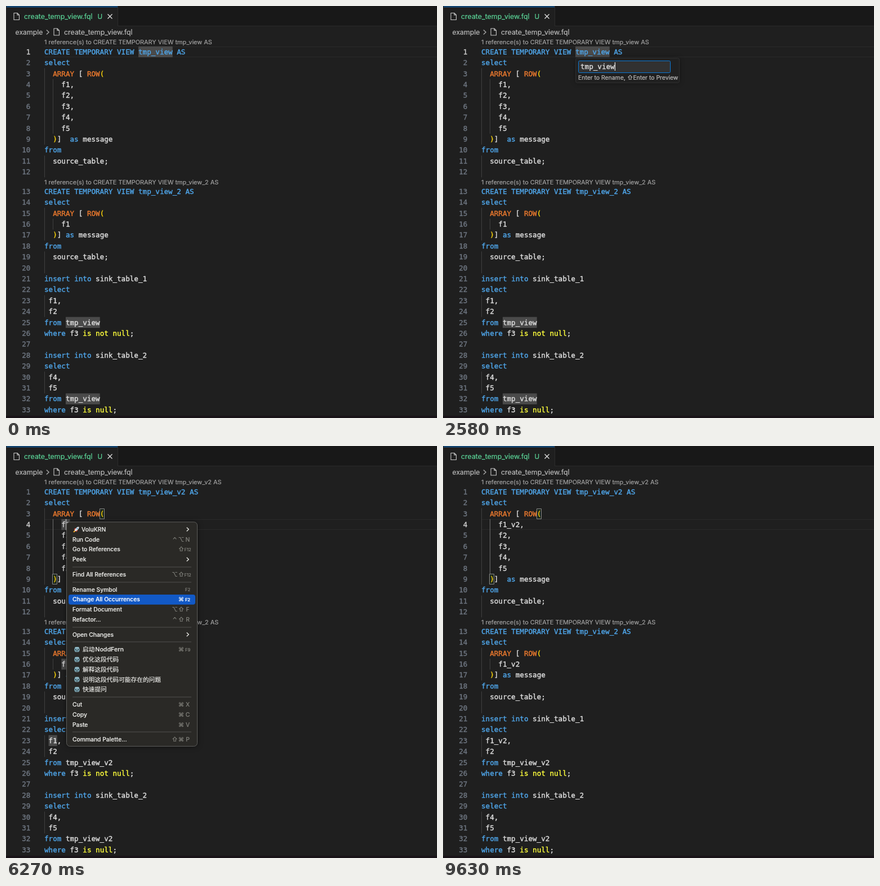
An HTML page with a canvas for the animation above (9660 ms loop, 765 px wide and 732 px high).

```html
<!DOCTYPE html>
<html lang="en">
<head>
<meta charset="utf-8">
<title>Rename symbol</title>
<style>
html, body { margin: 0; height: 100%; overflow: hidden; background: #1f1f1f; }
canvas { display: block; }
</style>
</head>
<body>
<canvas id="stage" width="765" height="732"></canvas>
<script>
const ctx = document.getElementById('stage').getContext('2d');
const LOOP = 9660, LEFT = 68, CHAR = 7.59, ROW = 19.4;
const MONO = '12.6px "DejaVu Sans Mono", "Liberation Mono", monospace';
const ui = (size, weight = 400) =>
  `${weight} ${size}px Inter, "Noto Sans CJK SC", "Noto Sans CJK", "DejaVu Sans", sans-serif`;
const BLUE = '#4fa6ea', ORANGE = '#e8782e', YELLOW = '#ffff3c', GOLD = '#ffd70a',
  TEXT = '#dedede', GREEN = '#5ad296', ACCENT = '#0a78d6';

const MENUS = [
  { x: 274, y: 73, open: 690, move: 900, settle: 1650, pick: 1860, close: 2250 },
  { x: 107, y: 134.5, open: 5730, move: 5850, settle: 6270, pick: 6360, close: 6990 }
];
const POPUPS = [
  { line: 1, col: 22, word: 'tmp_view', open: 2430, ready: 2580, keys: [3270, 3420, 3570], close: 3840 },
  { line: 4, col: 4, word: 'f1', open: 7200, ready: 7440, keys: [7890, 7980, 8130], close: 8280 }
];
const CARET_ON = [[90, 2430], [3840, 4200], [4740, 7200], [8310, 8670], [9180, 9630]];

// label | shortcut modifiers | key; '>' marks a submenu, '-' a separator
const ITEMS = `VoluKRN|>
Run Code|⌃⌥|N
Go to References|⇧|F12
Peek|>
-
Find All References|⌥⇧|F12
-
Rename Symbol||F2
Change All Occurrences|⌘|F2
Format Document|⌥⇧|F
Refactor...|⌃⇧|R
-
Open Changes|>
-
启动 NoddFern|⌘|F9
优化这段代码
解释这段代码
说明这段代码可能存在的问题
快速提问
-
Cut|⌘|X
Copy|⌘|C
Paste|⌘|V
-
Command Palette...|⇧⌘|P`.split('\n');
const RENAME = 5, CHANGE_ALL = 6;

const code = (view, field) => `CREATE TEMPORARY VIEW ${view} AS
select
  ARRAY [ ROW(
    ${field},
    f2,
    f3,
    f4,
    f5
  )]  as message
from
  source_table;

CREATE TEMPORARY VIEW tmp_view_2 AS
select
  ARRAY [ ROW(
    ${field}
  )] as message
from
  source_table;

insert into sink_table_1
select
 ${field},
 f2
from ${view}
where f3 is not null;

insert into sink_table_2
select
 f4,
 f5
from ${view}
where f3 is null;`.split('\n');

const within = (t, [a, b]) => t >= a && t < b;
const lineY = n => n < 13 ? 81.4 + ROW * (n - 1) : 329.4 + ROW * (n - 13);
const colX = c => LEFT + c * CHAR;

function rect(x, y, w, h, color) {
  ctx.fillStyle = color;
  ctx.fillRect(x, y, w, h);
}

// A hairline stroke gives the text the slightly heavy look of smoothed glyphs.
function label(str, x, y, font, color, align = 'left') {
  ctx.font = font;
  ctx.fillStyle = ctx.strokeStyle = color;
  ctx.textAlign = align;
  ctx.lineWidth = font === MONO ? .38 : .22;
  ctx.lineJoin = 'round';
  ctx.fillText(str, x, y);
  ctx.strokeText(str, x, y);
}

function round(x, y, w, h, r, fill, stroke) {
  ctx.beginPath();
  ctx.roundRect(x, y, w, h, r);
  if (fill) { ctx.fillStyle = fill; ctx.fill(); }
  if (stroke) { ctx.strokeStyle = stroke; ctx.lineWidth = 1; ctx.stroke(); }
}

function shape(path, x, y, color, width = 1.1) {
  ctx.save();
  ctx.translate(x, y);
  ctx.strokeStyle = color;
  ctx.lineWidth = width;
  ctx.stroke(new Path2D(path));
  ctx.restore();
}

const fileIcon = (x, y) => shape('M.5 .5H6.5L10 4V12.5H.5ZM6.5 .5V4H10', x, y, '#c8c8c8');
const chevron = (x, y, color, s = 1) =>
  shape(`M${-1.8 * s} ${-3.4 * s}L${1.8 * s} 0L${-1.8 * s} ${3.4 * s}`, x, y, color, 1.4);

function header() {
  rect(0, 0, 765, 36, '#181818');
  rect(198, 35, 567, 1, '#2b2b2b');
  rect(0, 1, 198, 35, '#1f1f1f');
  rect(198, 0, 1, 36, '#2b2b2b');
  rect(0, 1, 198, 1, ACCENT);
  fileIcon(13.5, 12);
  label('create_temp_view.fql', 32, 23.3, ui(12.4), GREEN);
  label('U', 162.5, 23, ui(11.6), GREEN);
  shape('M0 0L8 8M8 0L0 8', 180.5, 14.5, '#e0e0e0', 1.3);
  label('example', 16.5, 50.7, ui(12.3), '#b8b8b8');
  chevron(74, 46.5, '#a8a8a8', 1.2);
  fileIcon(84.5, 39.5);
  label('create_temp_view.fql', 103, 50.7, ui(12.4), '#b8b8b8');
}

function tokenColor(word, line) {
  if (line.startsWith('CREATE')) return BLUE;
  if (/^(ARRAY|ROW)$/.test(word)) return ORANGE;
  if (/^(select|from|as|insert|into|where)$/.test(word)) return BLUE;
  if (/^(is|not|null)$/.test(word)) return YELLOW;
  return /[()]/.test(word) ? GOLD : TEXT;
}

function guide(col, from, to, color = '#404040') {
  const top = lineY(from) - ROW / 2;
  rect(Math.round(colX(col)), top, 1, lineY(to) + ROW / 2 - top, color);
}

function bracketBox(line, col) {
  ctx.strokeStyle = '#888';
  ctx.lineWidth = 1;
  ctx.fillStyle = 'rgba(0,100,0,.1)';
  const box = [Math.round(colX(col)) - .5, Math.round(lineY(line) - 9.7) + .5, 8, 18];
  ctx.fillRect(...box);
  ctx.strokeRect(...box);
}

function editor(t) {
  const view = t < 3870 ? 'tmp_view' : 'tmp_view_v2';
  const field = t < 8310 ? 'f1' : 'f1_v2';
  const active = t < 5190 ? 1 : 4;
  const lines = code(view, field);

  const y = Math.round(lineY(active) - 9.7);
  rect(LEFT, y, 697, 1, '#2a2a2a');
  rect(LEFT, y + 18, 697, 1, '#2a2a2a');

  const marks = t < 3840 ? [[1, 22, 8], [25, 5, 8], [32, 5, 8]]
    : within(t, [5790, 8310]) ? [[4, 4, 2], [16, 4, 2], [23, 1, 2]] : [];
  for (const [n, col, len] of marks)
    rect(colX(col), lineY(n) - 9.7, len * CHAR, ROW, '#4a4a4a');

  for (const [a, b] of [[3, 9], [11, 12], [15, 17], [19, 20], [23, 24], [30, 31]]) guide(0, a, b);
  guide(2, 4, 8, active === 4 ? '#707070' : '#404040');
  guide(2, 16, 16);
  if (active === 4) { bracketBox(3, 13); bracketBox(9, 2); }

  lines.forEach((line, i) => {
    const base = lineY(i + 1) + 4.3;
    label(i + 1, 43.3, base, MONO, i + 1 === active ? '#d0d0d0' : '#6e7681', 'right');
    for (const m of line.matchAll(/\w+|[^\w\s]/g))
      label(m[0], colX(m.index), base, MONO, tokenColor(m[0], line));
  });

  const lens = name => `1 reference(s) to CREATE TEMPORARY VIEW ${name} AS`;
  label(lens(t < 4200 ? 'tmp_view' : 'tmp_view_v2'), LEFT, 67.8, ui(10.88), '#a0a0a0');
  label(lens('tmp_view_2'), LEFT, 316.6, ui(10.88), '#a0a0a0');

  if (CARET_ON.some(span => within(t, span)))
    rect(colX(active === 1 ? 27 : 5) - .2, lineY(active) - 9.7, 1.6, ROW, '#b8b8b8');
}

function popup(p, t) {
  if (!within(t, [p.open, p.close])) return;
  const x = Math.round(colX(p.col)), y = Math.round(lineY(p.line) + 10.8);
  const value = p.word + '_v2'.slice(0, p.keys.filter(k => t >= k).length);
  ctx.save();
  ctx.shadowColor = 'rgba(0,0,0,.4)';
  ctx.shadowBlur = 8;
  round(x + .5, y + .5, 184, 44, 3, '#202020');
  ctx.restore();
  round(x + .5, y + .5, 184, 44, 3, null, '#303030');
  round(x + 5.5, y + 5.5, 163, 21, 2, '#313131', ACCENT);
  if (t < p.ready) rect(x + 9, y + 7, value.length * CHAR, 18, '#264f78');
  label(value, x + 9, y + 19.5, MONO, TEXT);
  rect(x + 9 + value.length * CHAR, y + 8, 1.3, 15, '#e0e0e0');
  label('Enter to Rename, ⇧Enter to Preview', x + 5, y + 39, ui(10.4), '#bcbcbc');
}

function rocket(x, y) {
  ctx.save();
  ctx.translate(x, y);
  ctx.rotate(Math.PI / 4);
  rect(-3.2, 0, 6.4, 3, '#d8402f');
  rect(-1, 3, 2, 4, '#f5a623');
  ctx.beginPath();
  ctx.ellipse(0, -1, 2.1, 5, 0, 0, 7);
  ctx.fillStyle = '#dfe3e8';
  ctx.fill();
  rect(-1, -3, 2, 2, '#4a90c2');
  ctx.restore();
}

function robot(x, y) {
  round(x - 5, y - 1.5, 10, 4, 1, '#4b7482');
  round(x - 4, y - 4.5, 8, 9, 2, '#8fb9c6');
  rect(x - 3, y - 1, 2, 2, '#20343c');
  rect(x + 1, y - 1, 2, 2, '#20343c');
  rect(x - 2.5, y + 2, 5, 1.2, '#263c44');
}

function hovered(m, t) {
  if (t < m.move) return -1;
  if (t >= m.pick) return RENAME;
  const p = Math.min(1, (t - m.move) / (m.settle - m.move));
  return Math.floor(CHANGE_ALL * p * (2 - p) + 1e-6);
}

function menu(m, t) {
  const fade = 180;
  if (!within(t, [m.open, m.close + fade])) return;
  ctx.save();
  ctx.globalAlpha = Math.min(1, 1 - (t - m.close) / fade);
  ctx.translate(m.x, m.y);
  ctx.save();
  ctx.shadowColor = 'rgba(0,0,0,.5)';
  ctx.shadowBlur = 10;
  round(.5, .5, 232, 398.5, 6, '#2a2926');
  ctx.restore();
  round(.5, .5, 232, 398.5, 6, null, '#5c5c5a');

  const hot = hovered(m, t);
  let y = 13.6, row = 0;
  for (const item of ITEMS) {
    if (item === '-') {
      rect(11, Math.round(y - 4.9), 211, 1, '#51514e');
      y += 8.9;
      continue;
    }
    const [name, mods = '', key] = item.split('|');
    const on = row === hot, cjk = /[一-龥]/.test(name);
    const tint = on ? '#fff' : '#85857f';
    if (on) round(4, y - 8.7, 225, 17.8, 4, '#1259c6');
    if (row === 0) rocket(18, y);
    if (cjk) robot(19, y);
    label(name.replace(' N', '\u200aN'), cjk ? 29 : row ? 11 : 27, y + 3.8,
      ui(cjk ? 10.7 : 10.3, 500), on ? '#fff' : '#e9e9e6');
    if (mods === '>') chevron(215.5, y, '#e4e4e0');
    else [...mods].reverse().forEach((c, i) => label(c, 204 - i * 11.5, y + 3.8, ui(10.3), tint, 'center'));
    if (key) label(key, 215.5, y + (key[1] ? 3.6 : 3.8), ui(key[1] ? 7.6 : 10.3, on ? 600 : 400), tint, 'center');
    y += 17.78;
    row++;
  }
  ctx.restore();
}

function draw(now) {
  const t = now % LOOP;
  rect(0, 0, 765, 732, '#1f1f1f');
  header();
  editor(t);
  for (const p of POPUPS) popup(p, t);
  for (const m of MENUS) menu(m, t);
  rect(0, 0, 1, 732, '#2b2b2b');
  rect(0, 728, 765, 4, '#191418');
}

const start = performance.now();
function tick() {
  draw(performance.now() - start);
  requestAnimationFrame(tick);
}
tick();
</script>
</body>
</html>
```
